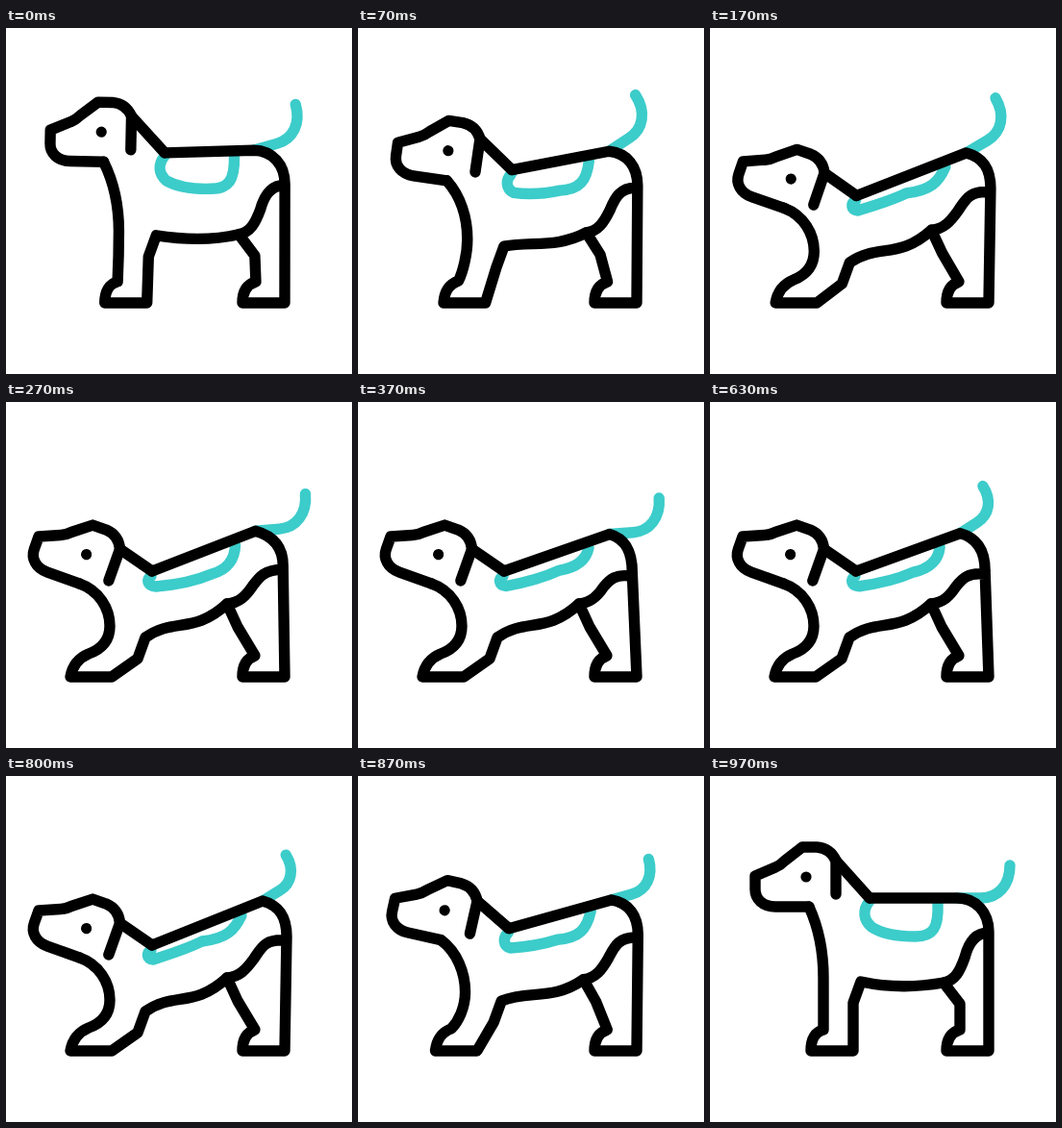
An HTML page for the animation above (1670 ms loop, 360 by 360 pixels).

```html
<!DOCTYPE html>
<html lang="en">
<head>
<meta charset="utf-8">
<title>Stretching dog</title>
<style>
  html, body { margin: 0; width: 100%; height: 100%; overflow: hidden; background: #fff; }
  svg { display: block; width: 100vw; height: 100vh; }
  path { fill: none; stroke: #000; stroke-width: 11.4; stroke-linecap: round; stroke-linejoin: round; }
  .accent { stroke: #3cccca; }
</style>
</head>
<body>
<svg viewBox="0 0 360 360">
  <path id="tail" class="accent"/>
  <path id="spot" class="accent"/>
  <path id="rear"/>
  <path id="front"/>
  <g id="head">
    <path d="M131 88Q125 75 111 74H96L78 88Q73 93 68 95L47 104V118C47 128 55 136 68 136H103M131 90V123"/>
    <circle cx="100" cy="105" r="5.6"/>
  </g>
</svg>
<script>
const LOOP = 1670, STEP = 100 / 3, LAST = 29;
const NOSE = [47, 104], NOD = 19.5;

const el = id => document.getElementById(id);
const set = (id, d) => el(id).setAttribute('d', d);

const ease = (t, a, b) => {
  const x = Math.min(1, Math.max(0, (t - a) / (b - a)));
  return x * x * (3 - 2 * x);
};

// Extremes of the tail's swing: time, degrees
const swings = [[-80, 2], [110, 38], [300, 2], [740, 38], [967, 0]];

function swing(t) {
  return swings.slice(1).reduce((angle, [time, value], i) => {
    const [from, before] = swings[i];
    return angle + (value - before) * ease(t, from, time);
  }, swings[0][1]);
}

function draw(ms) {
  const t = Math.min(LAST, Math.floor((ms + 4) / STEP)) * STEP;
  const bow = ease(t, -33, 190) - ease(t, 800, 966);
  const rock = t > 167 && t < 800 ? Math.sin(Math.PI * (t - 167) / 633) : 0;
  const sway = Math.sin(Math.PI * rock);

  // A standing point and how far it moves in a full bow
  const at = (x, y, dx = 0, dy = 0) => [x + dx * bow, y + dy * bow];
  const add = ([x, y], [dx, dy]) => [x + dx, y + dy];

  const nod = NOD * bow, rad = nod * Math.PI / 180;
  const shift = at(0, 0, -13, 36);
  const onHead = (x, y) => {
    const dx = x - NOSE[0], dy = y - NOSE[1];
    return add(add(NOSE, shift),
      [dx * Math.cos(rad) - dy * Math.sin(rad), dx * Math.sin(rad) + dy * Math.cos(rad)]);
  };
  el('head').setAttribute('transform', `translate(${shift}) rotate(${nod} ${NOSE})`);

  const withers = at(166, 127, -14, 49);
  const groin = at(243, 215, -13, -5);
  const hip = at(257, 127, 10 - 3 * rock - 6 * sway, 3 + 9 * rock);
  const rump = at(290, 162, 2 - 8 * rock, 5 + 15 * rock * rock);

  // Neck, chest, foreleg and belly
  set('front', `M${withers}L${onHead(131, 88)}M${onHead(103, 136)}
    C${at(114, 160, -17, 36)} ${at(118, 185, -10, 30)} ${at(118, 210, -10, 23)}
    C${at(118, 225, -10, 25)} ${at(118, 250, -21, 8)} ${at(118, 264, -32, -2)}
    C${at(108, 267, -34)} ${at(105, 275, -36)} ${at(105, 286, -38)}
    L${at(149, 286, -39)} ${at(149, 236, -12, 31)} ${at(157, 214, -12, 31)}
    C${at(185, 220, -10, 4)} ${at(215, 220, -20, 22)} ${groin}`);

  // Back, rump, hind leg and thigh
  set('rear', `M${withers}L${hip}
    C${add(hip, at(20, 0, -2, 5))} ${add(rump, [0, -20])} ${rump}
    L290 286H246C246 275 250 267 ${at(260, 264, -1)}
    L${at(260, 237, -19, -3)} ${groin}
    C${at(255, 213, -12, -4)} ${at(260, 203, -10, -2)} ${at(265, 189, -7 - 3 * rock, 1 + 3 * rock)}
    C${at(268, 177, -2 - 5 * rock, 1 + 8 * rock)} ${at(274, 163, -4 - 2 * rock, 6 + 11 * rock)}
     ${add(rump, at(0, 1, 0, 3))}`);

  set('spot', `M${at(166, 130, -15, 51)}
    C${at(158, 140, -12, 44)} ${at(160, 150, -14, 41)} ${at(168, 157, -15 + 3 * sway, 34 + sway)}
    C${at(180, 165, -8 + 8 * sway, 20 + 5 * sway)} ${at(200, 167, -10 + 10 * sway, 12 + 6 * sway)}
     ${at(214, 167, -10 + 10 * sway, 5 + 7 * sway)}
    C${at(232, 167, -2, 2 + 6 * sway)} ${at(238, 158, 0, 2 + 4 * sway)}
     ${at(237, 133, 8 - 5 * sway - 3 * rock, 12 + 8 * rock)}`);

  // The tail hangs on the hip and draws in during the second swing
  const size = 1 - 0.17 * (ease(t, 300, 700) - ease(t, 800, 967));
  const [tuck, reach, rise] = [25, 55, 34].map(v => v * size);
  set('tail', `M0 0H${tuck}C${reach * 0.78} 0 ${reach} ${-rise * 0.4} ${reach} ${-rise}`);
  el('tail').setAttribute('transform', `translate(${hip}) rotate(${-swing(t)})`);
}

const start = performance.now();
function tick() {
  draw((performance.now() - start) % LOOP);
  requestAnimationFrame(tick);
}
tick();
</script>
</body>
</html>
```
